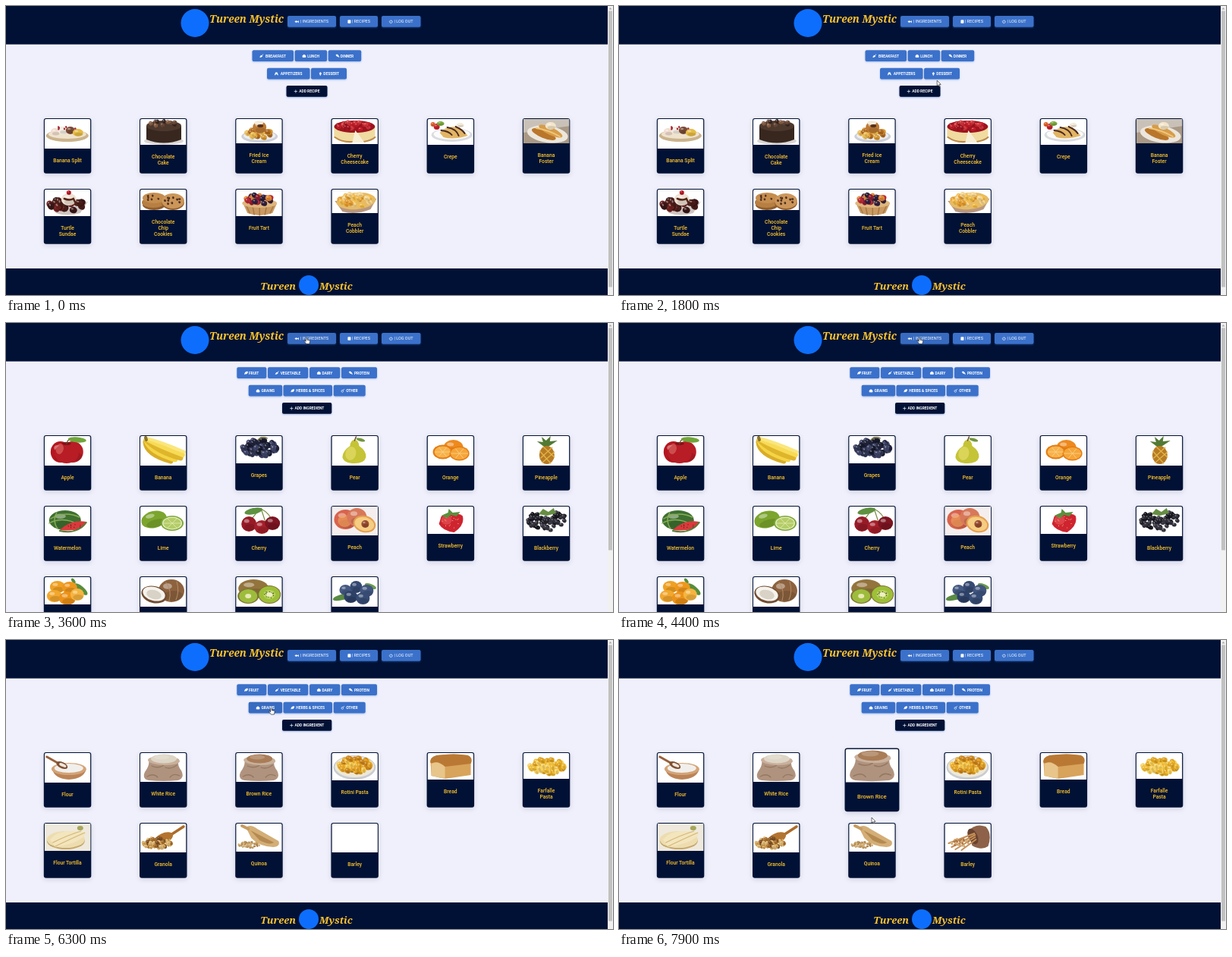
Recreate the animation shown at these times as an HTML page. Size 800 by 381 pixels, loop 8000 ms.

```html
<!DOCTYPE html>
<html lang="en">
<head>
<meta charset="utf-8">
<title>Recipe pantry</title>
<style>
html, body { margin: 0; width: 100%; height: 100%; overflow: hidden; background: #f0f0fc }
#stage { display: block; font-family: Roboto, Arial, sans-serif }
text { white-space: pre }
.brand { font: italic 700 13.6px "Noto Serif", serif; fill: #fdc52c }
.brand.small { font-size: 13px }
.btn { filter: drop-shadow(0 1.5px 1.3px #3b71ca66) }
.btn text { font-size: 4.9px; font-weight: 700; fill: #fff; text-anchor: end }
.btn.nav text { font-size: 5.5px; font-weight: 400 }
.card { filter: drop-shadow(0 2px 3px #00113322) }
.card text { font-size: 6.7px; font-weight: 500; fill: #fdc52c; text-anchor: middle }
.photo { filter: blur(.35px) }
</style>
</head>
<body>
<svg id="stage" width="800" height="381" viewBox="0 0 800 381"></svg>
<script>
const DARK = '#001135', BLUE = '#3b71ca', HOVER = '#386bc0';

// Shape helpers
const el = (x, y, rx, ry, c, rot = 0, o = 1) =>
  `<ellipse cx="${x}" cy="${y}" rx="${rx}" ry="${ry}" fill="${c}" opacity="${o}" transform="rotate(${rot} ${x} ${y})"/>`;
const rect = (x, y, w, h, c, r = 0) =>
  `<rect x="${x}" y="${y}" width="${w}" height="${h}" rx="${r}" fill="${c}"/>`;
const path = (d, c) => `<path d="${d}" fill="${c}"/>`;
const line = (d, c, w) => `<path d="${d}" fill="none" stroke="${c}" stroke-width="${w}" stroke-linecap="round"/>`;
const ball = (x, y, rx, ry, c, rot = 0) =>
  el(x, y, rx, ry, c, rot) +
  el(x + rx * .15, y + ry * .45, rx * .75, ry * .45, '#000', rot, .12) +
  el(x - rx * .3, y - ry * .4, rx * .35, ry * .25, '#fff', rot, .4);

function heap(x, y, rx, ry, r, n, colors) {
  let seed = 7, out = '';
  const rnd = () => (seed = seed * 16807 % 2147483647) / 2147483647;
  rnd(); rnd();
  for (let i = 0; i < n; i++) {
    const a = rnd() * 6.283, d = Math.sqrt(rnd());
    out += ball(+(x + rx * d * Math.cos(a)).toFixed(1), +(y + ry * d * Math.sin(a)).toFixed(1),
      r, r * .85, colors[i % colors.length], Math.round(rnd() * 90));
  }
  return out;
}
const sack = grain =>
  path('M11 8Q31 2 51 8Q48 16 54 23Q59 33 50 36Q30 38 11 36Q2 34 6 25Q13 16 11 8Z', '#b0937f') +
  line('M15 17Q24 21 31 16M48 16Q40 22 33 19M9 31Q18 26 23 32M52 30Q44 26 39 32', '#96785f', 1.3) +
  el(31, 10, 21, 6, '#c9b09c', 2) + el(31, 7.5, 17, 6, grain) + el(28, 5.5, 10, 3, '#fff', 0, .2);

// Photos, about 60 x 38
const desserts = [
  ['Banana Split', 56, el(30, 22, 28, 8, '#cbb38d') + el(30, 20, 25, 6, '#efe3cd') + ball(14, 17, 6, 5, '#f1ddd0') +
    ball(24, 15, 6, 5, '#f3ece2') + ball(34, 15, 6, 5, '#7a4a35') + ball(44, 18, 7, 5, '#e6bb45') + heap(28, 12, 16, 2, 1.4, 6, ['#a8232c'])],
  ['Chocolate|Cake', 51, el(31, 29, 26, 5, '#d9d6d4') + path('M8 9V27Q31 36 54 27V9Z', '#38271f') + el(31, 9, 23, 7, '#4d382d') +
    heap(31, 6, 18, 4, 3, 11, ['#6b4a38', '#8a6148', '#3a271f'])],
  ['Fried Ice|Cream', 49, el(31, 23, 24, 8, '#cdd0d8') + el(31, 22, 21, 6, '#eceef2') +
    heap(31, 19, 17, 6, 4, 20, ['#d79a32', '#edbe57', '#b26a22']) + ball(31, 11, 9, 8, '#bd7a34') + el(30, 5, 6, 3, '#f5ead9') + el(32, 9, 4, 2, '#54301e')],
  ['Cherry|Cheesecake', 50, path('M3 11V24Q12 32 28 31L31 15L42 30Q53 29 57 24V10Z', '#f0dba0') +
    line('M4 24Q14 31 27 30M42 30Q53 28 57 24', '#bd8a4b', 2) + el(30, 10, 27, 8, '#9d141f') +
    heap(30, 9, 23, 5, 3.2, 28, ['#c51f2a', '#a31520', '#d43b40']) + path('M31 15L27 31H43Z', '#f7efd6')],
  ['Crepe', 51, el(32, 21, 27, 9, '#dadce0') + el(32, 20, 24, 7, '#fbfbfb') + path('M16 18Q31 5 46 14L53 22Q34 28 21 24Z', '#e2b565') +
    line('M18 15Q28 16 32 21M26 11Q38 13 41 22M37 10Q46 14 49 19', '#4b2a20', 2) + ball(12, 10, 4, 4, '#c9242d') + ball(7, 7, 3, 3, '#e0622e') + ball(17, 6, 5, 3, '#79a83b') + ball(43, 8, 5, 3, '#f3e8d6')],
  ['Banana|Foster', 49, rect(0, 0, 62, 38, '#a99985') + path('M0 0H62V9L0 18Z', '#c9c1b8') + el(32, 20, 27, 11, '#ece6dc', 8) +
    el(27, 20, 17, 5, '#b9762b', 22) + el(36, 16, 17, 5, '#d79c48', 25) + line('M17 12Q32 14 48 23', '#efc57c', 2) + ball(36, 9, 7, 5, '#f3e6c9')],
  ['Turtle|Sundae', 52, path('M4 17Q30 26 57 16L47 31Q30 36 15 31Z', '#cfc6c4') + heap(30, 20, 24, 8, 5, 22, ['#3a1616', '#6f211f', '#4a1d18']) +
    ball(32, 13, 10, 8, '#eee0d3') + line('M26 12Q33 15 38 12L42 20', '#542417', 2.5) + ball(32, 4, 3, 3, '#b81926')],
  ['Chocolate|Chip|Cookies', 44, el(18, 20, 15, 7, '#8f5d2d') + el(17, 17, 15, 7, '#b77f42') + el(18, 11, 15, 7, '#c58d4f') + el(43, 17, 15, 10, '#935f2c') +
    el(43, 15, 15, 10, '#cc965a') + heap(43, 15, 11, 6, 1.6, 10, ['#4a2b1b']) + heap(16, 11, 10, 4, 1.5, 6, ['#4a2b1b'])],
  ['Fruit Tart', 52, path('M9 18H54L48 31Q31 37 15 31Z', '#c99a63') + line('M14 22L18 31M22 23L24 33M31 23V34M40 23L38 33M49 22L45 31', '#a97742', 1.4) + el(31, 18, 23, 6, '#dfb77c') +
    heap(31, 13, 18, 6, 4, 26, ['#33203f', '#bd2935', '#e08a34', '#271c35', '#8d1d30'])],
  ['Peach|Cobbler', 48, path('M4 15L14 29Q32 34 51 26L59 12Z', '#b9977d') + el(32, 15, 26, 11, '#e5bb68', -5) +
    heap(32, 14, 22, 8, 4, 28, ['#f2bd4c', '#e59c2f', '#f6d68f'])]
];
const fruit = [
  ['Apple', 56, ball(21, 21, 13, 14, '#b5161f') + ball(37, 21, 14, 14, '#b81c25') + el(29, 23, 16, 13, '#b81c25') + el(20, 17, 5, 7, '#e78a7f', 15, .45) +
    el(29, 10, 6, 2, '#7b1519') + line('M29 10Q30 6 33 4', '#66452a', 1.4) + el(43, 5, 12, 3.5, '#6fa53a', 5)],
  ['Banana', 56, line('M7 8Q8 24 40 33', '#d9ad28', 7) + line('M8 7Q14 22 46 31', '#f4d445', 6.5) + line('M8 5Q22 20 53 29', '#dfb52b', 7) +
    line('M8 4Q26 14 56 25', '#f7db56', 6) + line('M8 3Q28 8 58 21', '#fae67c', 4) + line('M7 2L8 5', '#867130', 4)],
  ['Grapes', 53, heap(31, 16, 23, 11, 4, 62, ['#20233b', '#303552', '#171a2c', '#41466a']) + line('M29 5Q34 0 41 3', '#7a7043', 1.5)],
  ['Pear', 56, path('M30 5Q35 5 36 13Q46 20 45 28Q43 36 30 36Q16 36 14 28Q14 20 24 13Q25 5 30 5Z', '#c5c336') + el(25, 23, 7, 9, '#e2dc66', 15, .7) + line('M30 6L32 1', '#6a4b29', 1.5) + el(38, 5, 6, 2, '#71953d', 15)],
  ['Orange', 56, ball(34, 15, 13, 10, '#ee8a1d') + el(20, 21, 13, 9.5, '#e57b12') + el(20, 21, 11, 7.5, '#f7b14b') + el(42, 23, 13, 9.5, '#e57b12') + el(42, 23, 11.5, 8, '#f5a53a') +
    line('M10 21H30M15 15L25 27M25 15L15 27M31 23H53M37 17L47 29M47 17L37 29', '#f9d58c', .8)],
  ['Pineapple', 56, path('M30 16L18 7L26 8L24 1L30 6L36 0L35 7L45 6Z', '#527a34') + el(31, 25, 10, 12, '#b77b24') +
    line('M22 20L36 36M23 29L38 15M26 14L41 28M25 35L41 21', '#e2b64b', 1.2)],
  ['Watermelon', 56, ball(27, 18, 21, 13, '#3e7031') + line('M8 16Q27 5 46 14M6 22Q24 12 46 24M16 8Q10 18 17 29', '#8aad55', 1.4) +
    path('M20 31Q35 16 55 20Q53 34 20 31Z', '#d93a3b') + line('M20 32Q43 37 55 21', '#557f38', 2) + heap(40, 26, 9, 3, .6, 8, ['#2b1712'])],
  ['Lime', 56, ball(18, 17, 17, 11, '#7ba52d', -15) + el(42, 22, 15, 10, '#7da63a') + el(42, 22, 13, 8.5, '#e6edbd') + el(42, 22, 11.5, 7.3, '#b4cd68') + line('M31 22H53M36 16L48 28M48 16L36 28', '#e3ebb4', .8)],
  ['Cherry', 56, line('M19 19Q26 8 33 3Q36 12 38 18M33 3Q45 9 49 22', '#768c3e', 1.2) + el(23, 6, 12, 4, '#5e9140', -12) + ball(17, 23, 10, 10, '#971b27') + ball(34, 27, 10, 9, '#a51f2a') + ball(48, 22, 10, 9, '#7d1421')],
  ['Peach', 55, rect(0, 0, 62, 38, '#f5eeee') + ball(18, 17, 15, 13, '#d9634c') + el(17, 19, 9, 8, '#f0a75e', 0, .6) + ball(33, 14, 13, 12, '#d8785a') + el(43, 23, 15, 11, '#e4a04f', 15) + el(43, 23, 13, 9, '#f5cd83', 15) + ball(44, 23, 5, 5, '#974b30')],
  ['Strawberry', 53, path('M18 13Q30 4 46 12Q50 24 35 34Q20 32 15 23Z', '#cf2430') + el(25, 18, 7, 6, '#ec6061', 0, .5) + heap(31, 20, 12, 9, .6, 16, ['#efc77c']) + path('M18 12L27 8L28 3L33 8L43 7L38 13L31 11L26 15Z', '#59903d')],
  ['Blackberry', 56, heap(16, 19, 10, 10, 3, 30, ['#20202a', '#363540', '#17171e']) + heap(33, 23, 9, 9, 3, 26, ['#24232d', '#3b3944']) + heap(47, 16, 9, 9, 3, 26, ['#17171e', '#34323d']) + path('M20 10L26 3L33 7L40 2L43 9L31 12Z', '#668e43')],
  ['Kumquat', 53, el(48, 16, 11, 4, '#568e3b', 40) + el(38, 5, 4, 2, '#568e3b', 55) + ball(17, 13, 10, 8, '#f0a123') + ball(33, 14, 10, 8, '#ee971d') + ball(13, 25, 10, 8, '#f2a72d') + ball(30, 28, 11, 9, '#ec9218') + ball(43, 23, 9, 8, '#f5b440')],
  ['Coconut', 56, ball(41, 18, 17, 15, '#8d623f') + line('M34 7Q42 18 38 31M48 6Q52 18 47 30', '#b68d65', 1) + el(18, 23, 17, 11, '#704d33', 15) + el(18, 22, 15, 9, '#f6f3ed', 15) + el(18, 23, 10, 6, '#d8d2c7', 15)],
  ['Kiwi', 56, ball(23, 15, 20, 12, '#94743d') + el(16, 25, 14, 10, '#7c7434') + el(16, 25, 12, 9, '#9ebc3c') + el(16, 25, 4, 3, '#e8e9b4') +
    el(44, 23, 15, 12, '#806f36') + el(44, 23, 14, 11, '#9dbf37') + el(44, 23, 8, 6, '#b9d260') + heap(44, 23, 7, 5, .6, 16, ['#25290f']) + el(44, 23, 4, 3, '#eef0c4')],
  ['Blueberry', 56, el(15, 26, 14, 4, '#5a8b43', -15) + el(51, 12, 8, 3, '#6b9a4c', 20) + ball(18, 17, 8, 7, '#455982') + ball(32, 13, 8, 8, '#354971') + ball(46, 18, 9, 8, '#41557f') + ball(25, 26, 9, 8, '#2d4067') + ball(41, 28, 9, 8, '#374c75')]
];
const grains = [
  ['Flour', 56, path('M10 21H55Q52 34 32 35Q13 34 10 21Z', '#bc8357') + el(32, 21, 23, 8, '#d3a477') + el(32, 20, 19, 6, '#f1efec') + line('M3 5L19 14', '#98603c', 3) + el(23, 16, 8, 4, '#80502f', 25) + el(24, 16, 5, 2, '#eee7df', 25)],
  ['White Rice', 55, sack('#ddd5c5')],
  ['Brown Rice', 55, sack('#a97d58')],
  ['Rotini Pasta', 53, el(30, 19, 28, 16, '#c9ccd1') + el(30, 18, 26, 14, '#eee8d9') + heap(30, 16, 21, 10, 4, 55, ['#e6a524', '#f4c64c', '#cc8519'])],
  ['Bread', 52, path('M4 13Q2 6 12 3Q36 0 53 3Q60 6 57 14V29L23 34L5 30Z', '#d8a35b') + path('M4 13Q2 6 12 3Q36 0 53 3Q60 6 57 14L23 18Z', '#b97934') + path('M5 14Q13 9 23 18V34L5 30Z', '#e8c58a')],
  ['Farfalle|Pasta', 51, heap(31, 18, 23, 10, 4, 50, ['#f0bc35', '#f8d261', '#dfa31f'])],
  ['Flour Tortilla', 53, rect(0, 0, 62, 38, '#eee9dc') + el(28, 23, 25, 11, '#c6a76b') + el(28, 21, 25, 11, '#eddcaf') + path('M7 21Q21 5 54 12Q53 24 14 31Z', '#f3e5bd') + line('M14 30Q37 19 53 12M11 25Q31 15 48 10', '#d3b778', 1.2) + el(47, 6, 4, 3, '#a6a65a')],
  ['Granola', 55, line('M37 17L57 4', '#ad6b28', 3.5) + el(30, 20, 14, 7, '#b47430', -25) + heap(22, 26, 19, 7, 2.7, 65, ['#a86f2c', '#d5a556', '#815022', '#e1bc78'])],
  ['Quinoa', 54, heap(17, 28, 14, 4, 1.7, 45, ['#c79e61', '#ddbc85', '#b68b50']) + path('M13 5Q19 0 28 7L56 23Q59 30 49 31Q30 30 20 19Z', '#d3ae76') + path('M19 9L50 25Q44 29 31 22Z', '#b58a50') + line('M8 3L16 7', '#c69b60', 4)],
  ['Barley', 55, '<g id="barley">' + path('M31 10Q40 -1 54 4Q63 14 57 30Q48 36 36 29Z', '#8d6249') + el(37, 17, 6, 11, '#69432f', -25) +
    line('M40 15L9 31M40 18L14 34M39 13L5 26M41 21L22 35', '#c58f55', 2) + heap(21, 25, 13, 5, 1.7, 30, ['#b77b43', '#dbb078']) + '</g>']
];

const icons = {
  fish: 'M0 3Q2 1 4 3L5.5 2V4.5L4 3Q2 5.5 0 3Z', book: 'M1.2 .8H5V5.2H1.2ZM1.2 4.2H5Z',
  power: 'M1.6 1.4A2.2 2.2 0 1 0 4.4 1.4M3 .4V2.8', carrot: 'M.5 5L1.4 3L3 2L4.2 3.2L3 4.4ZM4 2L5.3 .7Z',
  bun: 'M.7 5V2.6Q3 -.6 5.3 2.6V5Z', leg: 'M.5 1.2Q3 .2 4.3 2.6L5.4 4.8L3.8 4Q1 4 .5 1.2Z',
  table: 'M.6 5L1.8 1.2H4.2L5.4 5L3 3Z', cone: 'M1.6 2.2Q3 -.6 4.4 2.2L3 5.6Z', leaf: 'M.5 5Q.5 1 5 .8Q5.5 5 1.6 4.4Z',
  plus: 'M3 .5V5.5M.5 3H5.5', ring: 'M3 2.2L5.4 .5M3 2.2A1.6 1.6 0 1 0 3.4 4.6Q4 3 3 2.2'
};
// Buttons: x, y, width, icon, label
const nav = [[371, 13, 64, 'fish', '| INGREDIENTS'], [440, 13, 50, 'book', '| RECIPES'], [495, 13, 51.5, 'power', '| LOG OUT']];
const recipeBar = [[324.5, 58.3, 54.5, 'carrot', 'BREAKFAST'], [380.6, 58.3, 42.5, 'bun', 'LUNCH'], [424.7, 58.3, 43.5, 'leg', 'DINNER'],
  [344, 81.8, 56.5, 'table', 'APPETIZERS'], [402, 81.8, 47, 'cone', 'DESSERT'], [369.5, 105, 54, 'plus', 'ADD RECIPE']];
const foodBar = [[304.3, 58.3, 39, 'leaf', 'FRUIT'], [345, 58.3, 53.3, 'carrot', 'VEGETABLE'], [400, 58.3, 40.3, 'bun', 'DAIRY'], [442, 58.3, 47, 'leg', 'PROTEIN'],
  [319.7, 81.8, 44.4, 'bun', 'GRAINS'], [365.5, 81.8, 64.5, 'leaf', 'HERBS & SPICES'], [431.7, 81.8, 42, 'ring', 'OTHER'], [364, 105, 65.3, 'plus', 'ADD INGREDIENT']];

const button = ([x, y, w, icon, label]) => {
  const d = icons[icon];
  return `<g class="btn${y < 50 ? ' nav' : ''}">${rect(x, y, w, 14.8, icon == 'plus' ? DARK : BLUE, 2)}
    <path d="${d}" transform="translate(${x + 9.8} ${y + 5}) scale(.85)" fill="${d.endsWith('Z') ? '#fff' : 'none'}" stroke="#fff" stroke-width=".8"/>
    <text x="${x + w - 10}" y="${y + 9.3}">${label.replace('&', '&amp;')}</text></g>`;
};
const card = ([label, mid, photo], i) => {
  const x = 49.8 + i % 6 * 126.2, y = 148 + Math.floor(i / 6) * 93;
  const text = label.split('|').map((s, k) => `<text x="31.2" y="${mid + 2.4 + k * 8}">${s}</text>`).join('');
  return `<g transform="translate(${x} ${y})"><g class="card">${rect(0, 0, 62.5, 72.7, DARK, 3)}
    <svg x="1" y="1" width="60.5" height="${mid - 17}">${rect(0, 0, 60.5, 60, '#fff', 2.2)}<g class="photo">${photo}</g></svg>${text}</g></g>`;
};
const footer = rect(0, 346, 793, 35, DARK) + el(399, 368, 13, 13, '#0d6efd') +
  '<text class="brand small" x="382" y="374" text-anchor="end">Tureen</text><text class="brand small" x="413" y="374">Mystic</text>';
const page = (bar, cards, end) => `<g class="page">${bar.map(button).join('')}${cards.map(card).join('')}${end}</g>`;

const stage = document.getElementById('stage');
stage.innerHTML = rect(0, 0, 800, 381, '#f0f0fc') + rect(0, 0, 793, 50.6, DARK) +
  el(249, 22.5, 18.5, 18.5, '#0d6efd') + '<text class="brand" x="268" y="22">Tureen Mystic</text>' +
  nav.map(button).join('') + page(recipeBar, desserts, footer) + page(foodBar, fruit, '') + page(foodBar, grains, footer) +
  rect(793, 0, 7, 381, '#f1f1f1') + '<rect id="thumb" x="794" y="6.5" width="5" fill="#c1c1c1"/>' +
  path('M796.5 2L798.5 4.5H794.5Z', '#aaa') +
  `<clipPath id="clip"><rect id="clipBox" height="14.8" rx="2"/></clipPath>
  <g clip-path="url(#clip)"><circle id="ripple" fill="#fff"/></g>
  <g id="cursor" stroke="#111" stroke-width=".6" stroke-linejoin="round" fill="#fff">
    <path id="arrow" d="M0 0V7.2L1.7 5.7L2.8 8.2L4 7.7L2.9 5.3H5.1Z"/>
    <path id="hand" d="M-.8 .6Q0 -.4 .8 .6V3.2L4 3.8Q4.8 4 4.6 5.4L3.9 8.6H-.1L-2.9 5.2Q-2.9 4 -1.8 4.6L-.8 5.4Z"/>
  </g>`;

const $ = id => document.getElementById(id);
const pages = document.querySelectorAll('.page');
const brownRice = pages[2].querySelectorAll('.card')[2];
const blueButtons = document.querySelectorAll(`.btn rect[fill="${BLUE}"]`);
const show = (node, on) => node.setAttribute('display', on ? 'inline' : 'none');
const set = (node, attrs) => { for (const k in attrs) node.setAttribute(k, attrs[k]); };
const ease = (t, a, b) => { const k = Math.min(1, Math.max(0, (t - a) / (b - a))); return k * k * (3 - 2 * k); };
const inside = (x, y, bx, by, w) => x >= bx && x <= bx + w && y >= by && y <= by + 14.8;

const route = [[1700, 420, 101], [2600, 396, 19], [4400, 396, 19], [5300, 349.5, 89.5], [6800, 349.5, 89.5], [7880, 333, 234]];
const clicks = [[2750, nav[0]], [5750, foodBar[4]]];

function pointer(t) {
  let [, x, y] = route[0];
  for (let i = 1; i < route.length; i++) {
    const [a] = route[i - 1], [b, bx, by] = route[i], k = ease(t, a, b);
    x += (bx - x) * k;
    y += (by - y) * k;
  }
  return [x, y];
}

function draw() {
  const t = performance.now() % 8000;
  const current = t < 3200 ? 0 : t < 6100 ? 1 : 2;
  pages.forEach((p, i) => show(p, i == current));
  set($('thumb'), { height: current == 1 ? 293 : 364 });
  show($('barley'), t >= 6500);

  const [x, y] = pointer(t), visible = t >= 1700;
  const over = [...nav, ...(current ? foodBar : recipeBar)].some(([bx, by, w]) => inside(x, y, bx, by, w));
  for (const b of blueButtons) {
    const box = ['x', 'y', 'width'].map(k => +b.getAttribute(k));
    set(b, { fill: visible && inside(x, y, ...box) ? HOVER : BLUE });
  }
  set($('cursor'), { transform: `translate(${x} ${y})` });
  show($('cursor'), visible);
  show($('hand'), over);
  show($('arrow'), !over);

  const click = clicks.find(([start]) => t >= start && t < start + 500);
  show($('ripple'), click);
  if (click) {
    const [start, [bx, by, w]] = click, k = (t - start) / 500;
    set($('clipBox'), { x: bx, y: by, width: w });
    set($('ripple'), { cx: x, cy: y + 1, r: 50 * k, opacity: .3 * (1 - k) });
  }

  const s = 1 + .15 * ease(t, 7200, 7500);
  set(brownRice, { transform: `translate(31.25 36.3) scale(${s}) translate(-31.25 -36.3)` });
  requestAnimationFrame(draw);
}
draw();
</script>
</body>
</html>
```
